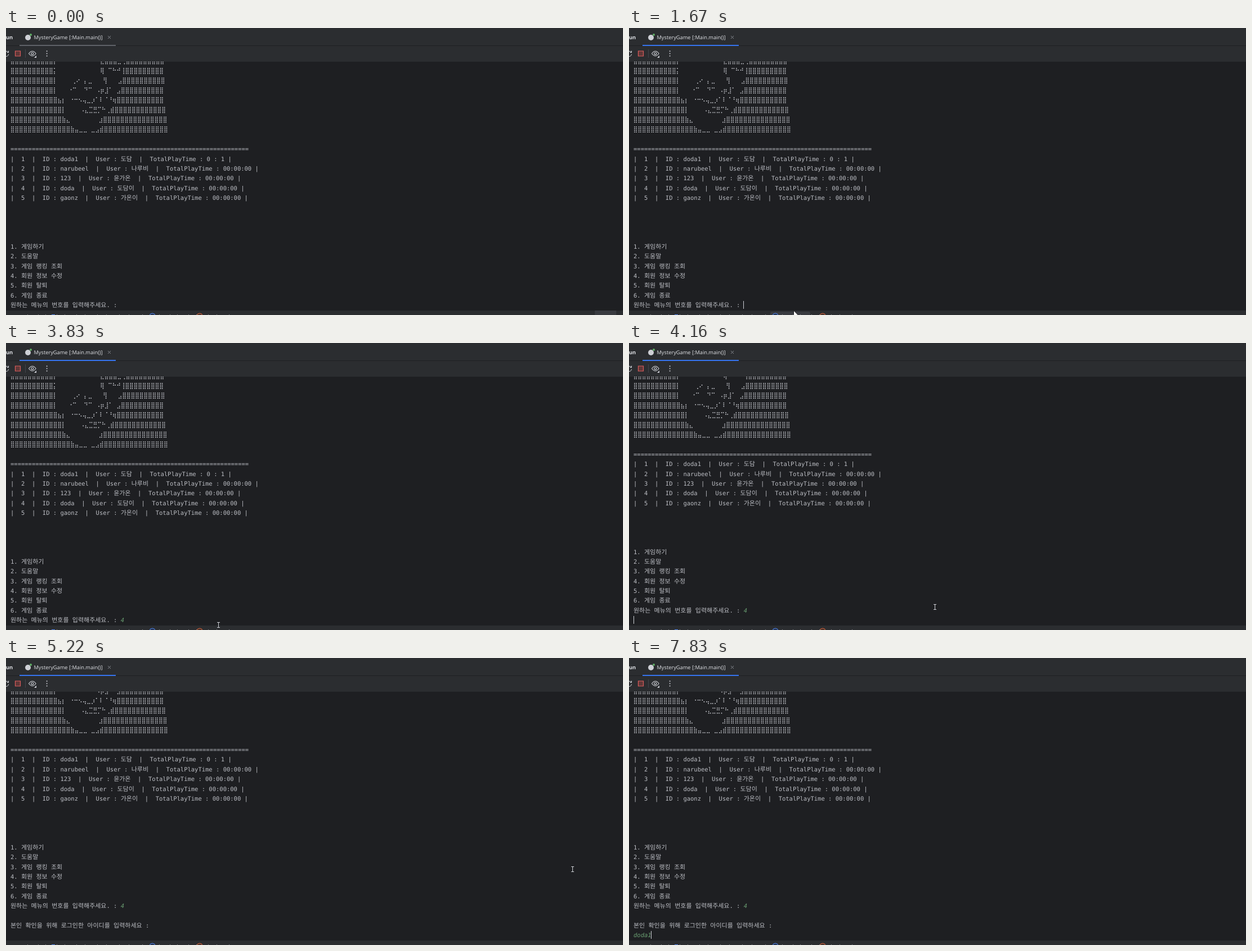
An HTML page with a canvas that plays this animation: 1096x511 px, repeating every 8000 ms.

```html
<!DOCTYPE html>
<html lang="ko">
<head>
<meta charset="utf-8">
<style>
  html, body { margin: 0; width: 100%; height: 100%; overflow: hidden; background: #1e1f22; }
  canvas { display: block; }
</style>
</head>
<body>
<canvas id="stage" width="1096" height="511"></canvas>
<script>
const ctx = document.getElementById('stage').getContext('2d');
const LOOP = 8000, W = 1096, H = 511;
const LEFT = 8, CELL = 6.315, HANGUL = 10.1, BRAILLE = 7.6;
const ROW = 17.37, LAST_ROW = 493.3, TOP = 60, BOTTOM = 503;
const FOCUS = 1670, DIGIT = 2860, ENTER = 4160, REPLY = 4230, LOGIN_START = 7026;
const KEY_GAP = 134, LAST_KEY = 7830;

const COLOR = {
  panel: '#2b2d30', console: '#1e1f22', text: '#bcbec4', icon: '#ced0d6',
  input: '#6a9f72', blue: '#3574f0', hover: '#393b40', muted: '#5f6268'
};
const MONO = '10.48px "DejaVu Sans Mono", monospace';
const KOREAN = '10.98px "Noto Sans CJK KR", "Noto Sans CJK JP", sans-serif';
const UI = '9.25px "Open Sans", "Noto Sans", sans-serif';

const full = n => '⣿'.repeat(n);
const player = (n, id, user, time) =>
  `|  ${n}  |  ID : ${id}  |  User : ${user}  |  TotalPlayTime : ${time} |`;
const IDLE = '00:00:00', LOGIN = 'doda1';

const lines = `
${full(10)}⡇            ⣎⣾⣶⣦⣀⢀${full(9)}
${full(10)}⡅            ⢿ ⠉⠓⠚⢸${full(9)}
${full(10)}⡇    ⢀⠔ ⡄⣀   ⢻   ⣠${full(10)}
${full(10)}⡇   ⠐⠉  ⠙⠉ ⠠⡶⣸⠁ ⣠${full(10)}
${full(11)}⣦⡆ ⠐⠒⠢⢤⣀⡰⠁⠇⠈⠘⢶${full(11)}
${full(12)}⡇    ⠠⣄⣉⣛⡉⠓⢀⣾${full(12)}
${full(12)}⣷⣄        ⣰${full(15)}
${full(14)}⣷⣤⣀⣀ ⣀⣠⣾${full(15)}

${'='.repeat(67)}
${player(1, LOGIN, '도담', '0 : 1')}
${player(2, 'narubeel', '나루비', IDLE)}
${player(3, '123', '윤가온', IDLE)}
${player(4, 'doda', '도담이', IDLE)}
${player(5, 'gaonz', '가온이', IDLE)}




1. 게임하기
2. 도움말
3. 게임 랭킹 조회
4. 회원 정보 수정
5. 회원 탈퇴
6. 게임 종료
원하는 메뉴의 번호를 입력해주세요. : `.slice(1).split('\n');

// Pointer key points: time, x, y.
const pointerPath = [
  [70, 976, 490], [470, 440, 478], [870, 248, 507], [FOCUS, 293, 504],
  [3660, 293, 504], [3830, 377, 502], [ENTER, 543, 470], [REPLY, 662, 448],
  [4490, 1005, 376], [5360, 1006, 376], [5680, 1051, 402], [5890, 1052, 403], [6080, 1110, 430]
];

function pointerAt(t) {
  const i = pointerPath.findIndex(([time]) => time > t);
  if (i < 1) return null;
  const [t0, x0, y0] = pointerPath[i - 1], [t1, x1, y1] = pointerPath[i];
  const k = (t - t0) / (t1 - t0);
  return { x: Math.round(x0 + (x1 - x0) * k), y: Math.round(y0 + (y1 - y0) * k) };
}

function typedCount(t) {
  if (t >= LAST_KEY) return 5;
  return Math.max(0, Math.min(4, Math.floor((t - LOGIN_START) / KEY_GAP) + 1));
}

// The caret stays solid after activity, then blinks.
function caretVisible(t) {
  if (t < FOCUS) return false;
  const hold = 965, off = 465, period = 1005;
  const activity = [FOCUS - 440, DIGIT, ENTER, REPLY, LOGIN_START];
  const idle = t - Math.max(...activity.filter(time => time <= t));
  return idle < hold || (idle - hold) % period >= off;
}

function rect(x, y, w, h, color) {
  ctx.fillStyle = color;
  ctx.fillRect(x, y, w, h);
}

function disc(x, y, r, color) {
  ctx.fillStyle = color;
  ctx.beginPath();
  ctx.arc(x, y, r, 0, 7);
  ctx.fill();
}

function stroke(path, color, width = 1) {
  ctx.strokeStyle = color;
  ctx.lineWidth = width;
  ctx.stroke(new Path2D(path));
}

function label(text, x, y, color, font = UI) {
  ctx.font = font;
  ctx.fillStyle = color;
  ctx.fillText(text, x, y);
}

function drawBraille(ch, x, y) {
  const bits = ch.codePointAt(0) - 0x2800;
  ctx.fillStyle = COLOR.text;
  ctx.beginPath();
  for (let bit = 0; bit < 8; bit++) {
    if (!(bits >> bit & 1)) continue;
    const col = bit < 6 ? Math.floor(bit / 3) : bit - 6;
    const row = bit < 6 ? bit % 3 : 3;
    const dx = x + 2 + col * 3.1, dy = y - 4.5 + row * 3;
    ctx.moveTo(dx, dy);
    ctx.arc(dx, dy, 0.98, 0, 7);
  }
  ctx.fill();
}

// Console text on its cell grid; returns the end position.
function print(text, x, y, color = COLOR.text, style = '') {
  for (const ch of text) {
    if (ch >= '⠀' && ch <= '⣿') {
      drawBraille(ch, x, y);
      x += BRAILLE;
      continue;
    }
    const wide = ch >= '가';
    if (ch !== ' ') label(ch, x, y + 3.8, color, style + (wide ? KOREAN : MONO));
    x += wide ? HANGUL : CELL;
  }
  return x;
}

function drawConsole(t) {
  const scroll = t < ENTER ? 0 : t < REPLY ? 1 : 3;
  const rowY = i => LAST_ROW + ROW * (i - lines.length + 1 - scroll);
  ctx.save();
  ctx.beginPath();
  ctx.rect(0, TOP, W, BOTTOM - TOP);
  ctx.clip();
  let end = LEFT;
  lines.forEach((text, i) => { end = print(text, LEFT, rowY(i)); });
  if (t >= DIGIT) end = print('4', end, rowY(lines.length - 1), COLOR.input, 'italic ');
  if (t >= REPLY) print('본인 확인을 위해 로그인한 아이디를 입력하세요 :', LEFT, LAST_ROW - ROW);
  if (t >= ENTER) end = print(LOGIN.slice(0, typedCount(t)), LEFT, LAST_ROW, COLOR.input, 'italic ');
  if (caretVisible(t)) rect(Math.floor(end), 486, 1, 14, COLOR.icon);
  ctx.restore();
}

function drawHeader(t) {
  rect(0, 0, W, TOP, COLOR.panel);
  rect(0, 31, W, 1, COLOR.console);
  label('un', 0, 20, '#dfe1e5', 'bold ' + UI);
  disc(39, 17, 5, COLOR.icon);
  disc(44, 12, 2, '#5fad65');
  label('MysteryGame [:Main.main()]', 49.5, 20.2, '#dfe1e5');
  stroke('M181 14l5 5m0-5l-5 5', '#868a91');
  rect(24, 30, 171, 2, t >= FOCUS ? COLOR.blue : COLOR.muted);

  stroke('M0 41.5h2.5l2 2m0-3v3h-3M0 50.5a4 4 0 0 0 4.5-4', COLOR.icon);
  rect(16.5, 41, 9, 9, '#5e3838');
  stroke('M16.5 41h9v9h-9z', '#db5c5c', 1.2);
  rect(34, 38, 1, 15, '#43454a');
  stroke('M40.5 45.5q6.3-8.5 12.6 0q-6.3 8.5-12.6 0z', COLOR.icon, 1.1);
  stroke('M44.8 45.5a2 2 0 1 0 4 0a2 2 0 1 0-4 0', COLOR.icon, 1.1);
  ctx.fillStyle = COLOR.icon;
  ctx.fill(new Path2D('M54 49v4h-4z'));
  for (let i = -1; i <= 1; i++) disc(72.6, 45.5 + i * 4.3, 1, COLOR.icon);
}

function badge(x, edge, fill) {
  disc(x, 513, 5.5, edge);
  disc(x, 513, 4.5, fill);
}

function drawFooter(t, pointer) {
  rect(0, BOTTOM, W, H - BOTTOM, COLOR.panel);
  if (t < 70) rect(1046, BOTTOM, 38, 8, COLOR.hover);
  if (pointer && pointer.y >= BOTTOM && pointer.x > 251 && pointer.x < 322) {
    ctx.fillStyle = COLOR.hover;
    ctx.beginPath();
    ctx.roundRect(251, 505, 71, 14, 3);
    ctx.fill();
  }
  // Tops of the cut-off breadcrumb letters.
  for (let x = 38, i = 0; x < 410; i++, x += 12 + i * 7 % 13) rect(x, 510, 1, 1, '#8b8d93');
  rect(81, 510, 6, 1, '#548af7');
  badge(260, '#548af7', '#25324d');
  badge(344, '#e0673f', '#45322b');
}

function drawPointer({ x, y }) {
  if (y < BOTTOM) {
    stroke(`M${x + .5} ${y - 5}v10M${x - 2} ${y - 4.5}h5M${x - 2} ${y + 4.5}h5`, COLOR.icon);
    return;
  }
  const arrow = `M${x} ${y}v11l2.6-2.4 1.8 4 1.8-.8-1.8-3.8h3.4z`;
  stroke(arrow, '#000');
  ctx.fillStyle = '#fff';
  ctx.fill(new Path2D(arrow));
}

function draw(t) {
  const pointer = pointerAt(t);
  ctx.textRendering = 'geometricPrecision';
  rect(0, 0, W, H, COLOR.console);
  drawConsole(t);
  drawHeader(t);
  drawFooter(t, pointer);
  if (pointer) drawPointer(pointer);
}

let start;
function loop(now) {
  start ??= now;
  draw((now - start) % LOOP);
  requestAnimationFrame(loop);
}
requestAnimationFrame(loop);
</script>
</body>
</html>
```
